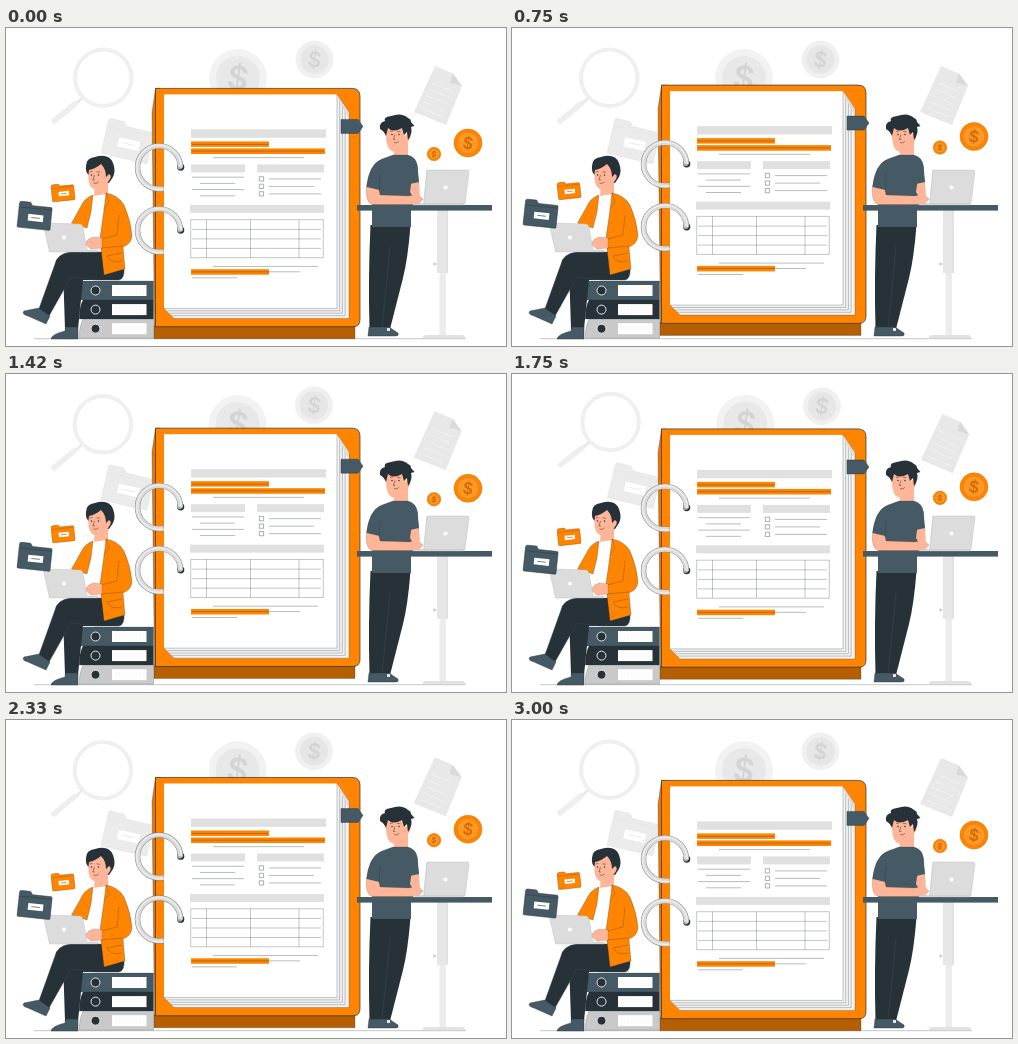
These frames come from a looping animation (500x318 px, 3040 ms). An HTML page with a canvas:

```html
<!DOCTYPE html>
<html lang="en">
<head>
<meta charset="utf-8">
<title>Ring binder</title>
<style>
html, body { margin: 0; width: 100%; height: 100%; overflow: hidden; background: #fff; }
canvas { display: block; width: 500px; height: 318px; }
</style>
</head>
<body>
<canvas id="stage"></canvas>
<script>
const W = 500, H = 318, LOOP = 3040, STEP = 1000 / 24;
const ORANGE = '#ff8500', NAVY = '#263238', SLATE = '#455a64', SKIN = '#ffb597';
const INK = 'rgba(38,50,56,.55)', SKIN_EDGE = 'rgba(120,70,50,.5)';
const canvas = document.getElementById('stage');
const ctx = canvas.getContext('2d');
const dpr = window.devicePixelRatio || 1;
canvas.width = W * dpr;
canvas.height = H * dpr;

function shape(d, fill, stroke, width = 0.5) {
  const path = new Path2D(d);
  if (fill) { ctx.fillStyle = fill; ctx.fill(path); }
  if (stroke) { ctx.strokeStyle = stroke; ctx.lineWidth = width; ctx.stroke(path); }
}
function rect(x, y, w, h, fill) {
  ctx.fillStyle = fill;
  ctx.fillRect(x, y, w, h);
}
function circle(x, y, r, fill, stroke, width = 0.7) {
  ctx.beginPath();
  ctx.arc(x, y, r, 0, Math.PI * 2);
  if (fill) { ctx.fillStyle = fill; ctx.fill(); }
  if (stroke) { ctx.strokeStyle = stroke; ctx.lineWidth = width; ctx.stroke(); }
}
function line(x1, y1, x2, y2, color = INK, width = 0.6) {
  ctx.beginPath();
  ctx.moveTo(x1, y1);
  ctx.lineTo(x2, y2);
  ctx.strokeStyle = color;
  ctx.lineWidth = width;
  ctx.stroke();
}
function placed(x, y, deg, draw) {
  ctx.save();
  ctx.translate(x, y);
  ctx.rotate(deg * Math.PI / 180);
  draw();
  ctx.restore();
}

// Linear rise and fall, 0..1..0
const tri = p => 1 - Math.abs(1 - 2 * (p - Math.floor(p)));
// Linear swing 0, 1, 0, -1, 0
const swing = p => 2 * tri(p + 0.25) - 1;

function coin(x, y, r, face, inner, mark, edge) {
  circle(x, y, r, face, edge, 0.5);
  circle(x, y, r * 0.77, inner, edge, 0.4);
  placed(x, y, 8, () => {
    ctx.fillStyle = mark;
    ctx.font = `600 ${r * 1.15}px Inter, Arial, sans-serif`;
    ctx.textAlign = 'center';
    ctx.textBaseline = 'middle';
    ctx.fillText('$', 0, r * 0.06);
  });
}

function folder(x, y, w, h, deg, color, edge) {
  placed(x, y, deg, () => {
    const l = -w / 2, t = -h / 2;
    shape(`M${l} ${t + 2}Q${l} ${t} ${l + 2} ${t}H${l + w * .33}L${l + w * .4} ${t + h * .12}` +
      `H${-l - 1}Q${-l} ${t + h * .12} ${-l} ${t + h * .2}V${-t - 1}Q${-l} ${-t} ${-l - 1} ${-t}` +
      `H${l + 1}Q${l} ${-t} ${l} ${-t - 1}Z`, color, edge);
    line(l + 1, t + h * .22, -l - 1, t + h * .22, edge, 0.4);
    rect(-w * .2, -h * .05, w * .46, h * .26, '#fff');
    line(-w * .1, h * .08, w * .16, h * .08, edge, 0.6);
  });
}

function backdrop(s) {
  ctx.save();
  ctx.translate(250, 159);
  ctx.rotate(swing(s / 1.5) * Math.PI / 180);
  ctx.translate(-250, -159);

  line(76, 70, 69, 77, '#e8e8e8', 2.5);
  ctx.lineCap = 'round';
  line(69, 76, 48, 93, '#eeeeee', 5.5);
  ctx.lineCap = 'butt';
  circle(97.3, 49.7, 28.3, '#fff', '#f0f0f0', 3);
  circle(97.3, 49.7, 29.8, null, '#e6e6e6', 0.5);
  circle(97.3, 49.7, 26.8, null, '#e2e2e2', 0.5);

  folder(122, 113, 47, 36, 13, '#ebebeb', '#e0e0e0');
  coin(232, 50, 28.5, '#f2f2f2', '#e8e8e8', '#d4d4d4', '#eeeeee');
  coin(308.5, 31.5, 18.5, '#f0f0f0', '#e6e6e6', '#d4d4d4', '#ebebeb');

  shape('M429 38L447 45.5L456 58L440 97L408 84Z', '#e8e8e8');
  shape('M447 45.5L444 54.5L456 58Z', '#dadada');
  for (let i = 0; i < 5; i++) {
    const x = 426 - i * 2.7, y = 55 + i * 6.3;
    line(x, y, x + 21, y + 8.6, '#f4f4f4', 0.8);
  }
  ctx.restore();
}

function ring(x, y) {
  circle(x + 21.7, y - 0.3, 3.6, NAVY);
  circle(x + 20.8, y - 0.8, 2.8, '#a8a8a8');
  const arc = (r, color, width) => {
    ctx.beginPath();
    ctx.arc(x, y, r, 0, 1.36, true);
    ctx.strokeStyle = color;
    ctx.lineWidth = width;
    ctx.stroke();
  };
  arc(21.5, '#707a80', 5.4);
  arc(21.5, '#dadada', 4.6);
  arc(22.2, '#ececec', 1.5);
}

function pageText() {
  const grey = '#e0e0e0';
  rect(185, 101, 135, 8.4, grey);
  rect(185, 113, 78, 5.5, ORANGE);
  rect(185, 120, 134, 5.6, ORANGE);
  line(186, 116, 262, 116);
  line(186, 122.7, 318, 122.7);
  line(207, 129.2, 298, 129.2);
  rect(185, 136, 54, 8, grey);
  rect(251, 136, 67, 8, grey);
  for (let i = 0; i < 4; i++) {
    const y = 148.8 + i * 6.2;
    line(i % 2 ? 194 : 186, y, i % 2 ? 229 : 238, y);
  }
  for (let i = 0; i < 3; i++) {
    const y = 150.5 + i * 7.5;
    ctx.strokeStyle = INK;
    ctx.lineWidth = 0.7;
    ctx.strokeRect(253.3, y - 2.2, 4.3, 4.3);
    line(263, y, i === 1 ? 308 : 315, y);
  }
  rect(184, 176.5, 134, 8, grey);

  ctx.strokeStyle = INK;
  ctx.lineWidth = 0.5;
  ctx.strokeRect(184.7, 191.3, 132.6, 38);
  [200.5, 244.5, 293].forEach(x => line(x, 191.3, x, 229.3, INK, 0.5));
  [201, 210.5, 220].forEach(y => line(186, y, 315, y, INK, 0.5));

  line(207, 238, 312, 238);
  rect(185, 240.8, 78, 5.5, ORANGE);
  line(186, 243.4, 294, 243.4);
  line(186, 249.4, 231, 249.4);
}

function binder(s) {
  ctx.save();
  ctx.translate(0, 0.4 - 6.6 * tri(s / 3));
  shape('M148 297H349V310.3H148Z', '#b55f00', INK);
  shape('M149.5 60L146 84L148.5 298H154V60Z', '#e67800', INK, 0.6);
  shape('M149.5 60H346Q354 60 354 68V291Q354 298.3 347 298.3H149.5Z', ORANGE, NAVY, 0.7);

  shape('M331 66L343 84V290H168L158 280Z', '#f3f3f3', INK);
  for (let i = 1; i < 4; i++) {
    shape(`M${331 + i * 2.7} ${66 + i * 4.2}V${280 + i * 2.4}H${159 + i * 2.2}`, null, INK);
  }
  shape('M331 66L343 84L343 91L333 72Z', '#dcdcdc');
  rect(158, 66, 173, 214, '#fff');
  line(331, 66, 331, 280, INK, 0.5);
  line(158, 280, 331, 280, INK, 0.5);
  shape('M335 91H352L357 98L352 105H335Z', SLATE, NAVY, 0.4);
  pageText();
  ring(153, 139);
  ring(153, 202);
  ctx.restore();
}

function archives() {
  ['#455a64', '#263238', '#c9c9c9'].forEach((color, i) => {
    const y = 253 + i * 19.1;
    shape(`M77 ${y}H147.5V${y + 19}H73.3Q73 ${y + 8} 77 ${y}Z`, color, INK, 0.4);
    rect(106, y + 4, 34.5, 11, '#fff');
    for (let x = 110; x < 138; x += 3) line(x, y + 6, x, y + 13, '#ededed', 0.5);
    circle(89.5, y + 9.5, 4.5, NAVY, '#e8e8e8', 1);
  });
}

function face(x, y) {
  circle(x - 4, y, 0.75, NAVY);
  circle(x + 3, y, 0.75, NAVY);
  shape(`M${x - 6} ${y - 3}l3 -.6M${x + 1} ${y - 3.2}l3.5 .5M${x - 1} ${y}l-1.6 5h2` +
    `M${x - 2} ${y + 8}q3 1.4 5 -1.2`, null, NAVY);
}

function sitter() {
  // legs and shoes
  shape('M57 240L59 301H72L77 252H96L90 226Z', NAVY);
  shape('M64 224Q51 226 49 236L32.5 282L43 288L65 249L90 252H113Q119 251 118 239L100 224Z',
    NAVY, '#3d4a51', 0.4);
  shape('M33 280L18 283Q15 286 22 288L40 296L44 288Z', SLATE, NAVY, 0.4);
  shape('M59.5 299H72V311H45Q46 306 59 303Z', SLATE, NAVY, 0.4);

  // head
  shape('M89 154L88 169L94 174L102 167V150Z', SKIN);
  shape('M80 138Q80 130 89 129Q103 125 107 135Q110 143 107 149L103 155L92 152L84 148Q79 145 80 138Z', NAVY);
  shape('M83 142Q81 153 85 159Q90 164 97 160L102 154Q107 148 103 146L100 149Q100 141 95 136Q89 141 83 142Z', SKIN);
  face(89.5, 147);

  // torso
  shape('M87 168L101 166L98 212L80 209Z', '#fff');
  shape('M87 167Q78 170 74 180L65.5 195L81 200L85 184Z', ORANGE, INK);
  shape('M100 165Q112 167 118 177Q125 193 126 208Q125 216 117 219L119 241L98 247L95 221L94 210L98 182Z',
    ORANGE, INK);
  shape('M113 187L111 207L95 211L95 220L117 218', null, INK);
  shape('M101 228L116 225M101 228Q105 236 116 233', null, INK);
  shape('M100 165L103 174L97 182', null, INK, 0.4);

  // laptop and hand
  shape('M96 210L87 209Q81 211 79 216L85 221L96 220Z', SKIN, SKIN_EDGE, 0.4);
  shape('M37.5 197Q37.5 195 39.5 195L74 196Q76 196 77 199L81 222L92 222V224H43.5Z', '#dcdcdc', '#b4b9bc', 0.4);
  circle(58, 209.5, 2, '#fff');
}

function smallFolders(s) {
  ctx.save();
  ctx.translate(0, -6.5 * tri(Math.max(0, s - 0.5) / 1.5));
  folder(28.8, 187.8, 33, 26, 6, SLATE, NAVY);
  folder(57, 164.3, 22.5, 17, -6, ORANGE, '#a85700');
  ctx.restore();
}

function stander() {
  // legs and shoes
  shape('M364.5 197H404.5Q402 230 397 250L384 301H363.5Q362 250 364.5 197Z', NAVY);
  shape('M384 218Q381 252 376 299', null, '#3d4a51', 0.5);
  shape('M363 299H383L392 305Q393 308 390 308H362Z', SLATE, NAVY, 0.4);
  rect(381, 300, 3, 3, '#e5e5e5');

  // head
  shape('M387 116L388 129L395 133L402 127V108Z', SKIN);
  shape('M380 100Q379 117 384 122Q389 126 397 121L402 114Q407 107 402 104L399 108L396 97H384Z', SKIN);
  shape('M374 101Q373 94 379 93Q377 89 385 88Q396 84 402 90Q405 91 405 94L408.5 98L405 99' +
    'Q407 105 402 112L401 104L398 107L396 100Q387 105 382 100L380 108Q378 103 374 101Z', NAVY);
  face(390, 106.5);

  // torso and arms
  shape('M366 176V199H405V176Z', SLATE);
  shape('M376 131L387 127L402 127Q410 129 411.5 138L413 163L408 177H372L373 162L360.5 159Q363 136 376 131Z',
    SLATE, INK, 0.4);
  shape('M374 146L373 164', null, INK);
  shape('M360.5 159L373 162L374 167L403 168L411 166L417 171L412 176.5H366Q359 174 360.5 159Z',
    SKIN, SKIN_EDGE, 0.4);
  shape('M406 150L412.5 153L414 168L409 172L404 164Z', SKIN);
  shape('M402 134L404 156L413 154L411 137Z', SLATE);
}

function desk() {
  rect(431, 182, 10.5, 63, '#e6e6e6');
  line(441.3, 182, 441.3, 245, '#cfcfcf', 0.6);
  rect(433.5, 245, 6.5, 63, '#ececec');
  shape('M417 310V308.5Q417 307 420 307H456Q459 307 459 310Z', '#e2e2e2');
  shape('M427.5 234L431 236L427.5 238Z', '#cccccc');
  rect(351, 177, 135, 5.6, SLATE);
  shape('M421 142H461Q463 142 463 144L459 175.5L457 177H407V175.5H418Z', '#dcdcdc', '#b4b9bc', 0.4);
  shape('M421 142L417.5 175.5H459', null, '#c4c4c4');
  circle(439.5, 159.5, 2, '#fff');
}

function brightCoins(s) {
  const y = -6.5 * tri(s / 1.5);
  coin(462, 115 + y, 14, ORANGE, '#ff9826', '#d06c00', '#dd7300');
  coin(428, 126 + y, 6.8, ORANGE, '#ff9826', '#c06400', '#dd7300');
}

function draw(s) {
  ctx.setTransform(dpr, 0, 0, dpr, 0, 0);
  ctx.lineJoin = 'round';
  rect(0, 0, W, H, '#fff');
  backdrop(s);
  line(28, 310.7, 460, 310.7, INK, 0.5);
  binder(s);
  archives();
  sitter();
  smallFolders(s);
  stander();
  desk();
  brightCoins(s);
}

const start = performance.now();
function tick() {
  const t = (performance.now() - start) % LOOP;
  const step = Math.min(72, Math.floor((t + 5) / STEP));
  draw(step / 24);
  requestAnimationFrame(tick);
}
tick();
</script>
</body>
</html>
```
